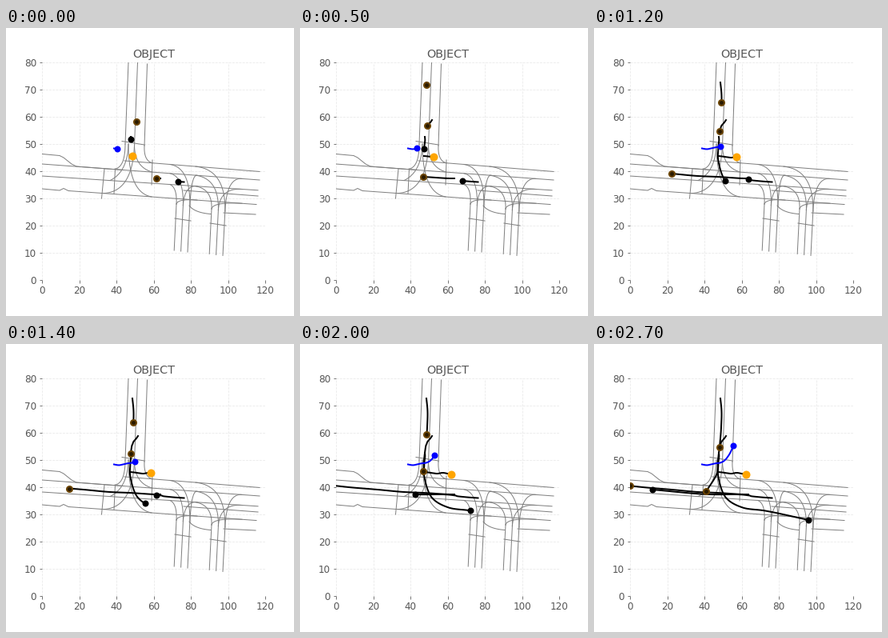
A matplotlib script that plays this animation: 360x360 px, repeating every 2.8 s.

```python
import numpy as np
import matplotlib.pyplot as plt
from matplotlib.animation import FuncAnimation

FRAMES = 28
INK = "#555555"
BROWN = "#6b4400"

plt.rcParams.update({"font.family": "DejaVu Sans", "font.size": 12})
fig = plt.figure(figsize=(5, 5), dpi=72, facecolor="white")
ax = fig.add_axes([0.125, 0.125, 0.775, 0.755])
ax.set(xlim=(0, 120), ylim=(0, 80))
ax.set_xticks(range(0, 121, 20))
ax.set_yticks(range(0, 81, 10))
ax.set_title("OBJECT", color=INK, fontsize=14.4, pad=6)
ax.tick_params(length=3.5, width=0.8, pad=3.5, color=INK, labelcolor=INK)
ax.grid(True, color="#e9e9e9", linestyle="--", linewidth=0.8)
ax.set_axisbelow(True)
for spine in ax.spines.values():
    spine.set_visible(False)


def to_data(points):
    """Stage pixels (y down) to axis units."""
    p = np.asarray(points, float)
    return np.column_stack([(p[:, 0] - 45) / 2.325, (315 - p[:, 1]) / 3.3975])


def road(*points):
    ax.plot(*to_data(points).T, color="gray", lw=1, zorder=2)


def turn(start, corner, end):
    """Road bending around a corner."""
    u = np.linspace(0, 1, 25)[:, None]
    a, b, c = (np.array(p, float) for p in (start, corner, end))
    road(*((1 - u)**2 * a + 2 * u * (1 - u) * b + u**2 * c))


def lane(k, x):
    """Point at x on the k-th lane border, counted from the top."""
    top, slope = ((157.7, 0.08), (170, 0.0735), (185, 0.066), (201, 0.073))[k]
    return x, top + slope * (x - 45)


def draw_lanes():
    road((45, 157.5), (67, 159.5), (72, 162), (82, 170), (88, 173),
         lane(1, 147))
    road(lane(0, 148), lane(0, 317))
    road(lane(1, 45), lane(1, 317))
    road(lane(2, 45), lane(2, 315))
    road((45, 201), (67, 203), (72, 200.5), (78, 203.5), lane(3, 122),
         lane(3, 313))
    road((222, 203), (315, 210))
    road((272, 231), (312, 233))


def draw_north():
    road((153, 43), (149, 145))
    road((164.5, 43), (160.5, 147))
    road((176.5, 45), (173, 147))
    road((145, 141.5), (173, 146))
    road((183, 165), (182, 196))
    road((136.5, 176), (135, 207))
    road((123, 176), (119.5, 213))
    turn((149, 145), (149, 176), lane(1, 134))
    turn((153, 145), (152, 180), lane(2, 130))
    turn((160.5, 147), (158, 205), lane(3, 122))
    turn((160.5, 147), (161, 174), lane(1, 183))
    turn((153, 145), (153, 206), lane(3, 182))
    turn((173, 147), (172, 166), lane(0, 183))


def draw_south(x, y, reach):
    """Arm of three borders, each joined to the lanes on both sides."""
    for k in range(3):
        head = (x + 8.4 * k, y + 1.5 * k)
        road(head, (head[0] - 2.8, 278 + (x - 213) * 0.1 + k))
        side = lane(2 - k, x - reach)
        turn(head, (head[0] + 1, side[1] + 4), side)
        side = lane(3 - k, x + reach + 18)
        turn(head, (head[0] + 2, side[1] - 2), side)
    road((x - 2, y + 18), (x + 18, y + 21))


def hermite(keys, points, t):
    """Smooth curve through points at the given keys."""
    keys = np.asarray(keys, float)
    points = np.asarray(points, float)
    t = np.clip(t, keys[0], keys[-1])
    slopes = np.gradient(points, keys, axis=0)
    i = np.clip(np.searchsorted(keys, t, side="right") - 1, 0, len(keys) - 2)
    h = (keys[i + 1] - keys[i])[:, None]
    u = (t - keys[i])[:, None] / h
    return ((2 * u**3 - 3 * u**2 + 1) * points[i]
            + (u**3 - 2 * u**2 + u) * h * slopes[i]
            + (3 * u**2 - 2 * u**3) * points[i + 1]
            + (u**3 - u**2) * h * slopes[i + 1])


class Agent:
    def __init__(self, keys, points, fill, size, trail="black", rim=None):
        self.keys, self.points = keys, points
        self.line, = ax.plot([], [], color=trail, lw=2, zorder=3)
        edge = 2 if rim else 0
        self.dot, = ax.plot([], [], "o", ms=size - edge, mfc=fill,
                            mec=rim or fill, mew=edge, zorder=4)

    def draw(self, t):
        start = self.keys[0]
        if t < start:
            self.line.set_data([], [])
            self.dot.set_data([], [])
            return
        times = np.linspace(start, t, int((t - start) * 4) + 1)
        path = to_data(hermite(self.keys, self.points, times))
        self.line.set_data(*path.T)
        self.dot.set_data(*path[-1:].T)


draw_lanes()
draw_north()
draw_south(213, 220, 8)
draw_south(257, 226, 20)
turn((229, 222), (236, 231), (256, 232.5))

KEYS = (-2, 0, 5, 8, 12, 16, 20, 27)
car = dict(fill="#2a1a00", size=9, rim=BROWN)
west = Agent((-1, 0, 5, 8, 12, 16, 18, 27),
             [(193, 188), (188, 188), (154, 186), (130, 185), (97, 182),
              (61, 179), (45.3, 177.3), (44.6, 177)], **car)
late = Agent((4, 8, 16, 27),
             [(158, 68), (159.3, 81), (159, 103.5), (157, 129)], **car)
north = Agent(KEYS,
              [(165, 115), (163.3, 117.5), (159.3, 122.3), (158.3, 125),
               (157, 129), (155, 145.5), (154.3, 159.5), (140.3, 184.3)],
              **car)
follower = Agent(KEYS,
                 [(222.5, 192.5), (215, 192), (203.3, 191), (197, 190.3),
                  (193.3, 189.3), (178.3, 188), (144.3, 188), (73, 182)],
                 "black", 8)
turner = Agent(KEYS,
               [(156, 136), (156.3, 139.3), (155.3, 151.5), (155.3, 165.3),
                (164.3, 191.3), (185.3, 204.3), (213, 208.3), (268.3, 220)],
               "black", 8)
walker = Agent(KEYS,
               [(135, 150.5), (139.3, 151.3), (146.3, 150.5), (151.5, 149.3),
                (158.3, 148.3), (163.5, 145.3), (168.3, 139.3),
                (174.3, 127.3)],
               "blue", 8, trail="blue")
ego = Agent(KEYS,
            [(155, 160), (158.3, 160.3), (167, 161.5), (171.5, 162),
             (178.3, 161), (184.3, 162), (189.3, 163.3), (190.3, 163.3)],
            "orange", 10)
agents = [west, late, north, follower, turner, walker, ego]


def update(frame):
    for agent in agents:
        agent.draw(frame)
    return [a for agent in agents for a in (agent.line, agent.dot)]


anim = FuncAnimation(fig, update, frames=FRAMES, interval=100,
                     repeat=True, repeat_delay=0, blit=False)
plt.show()
```
